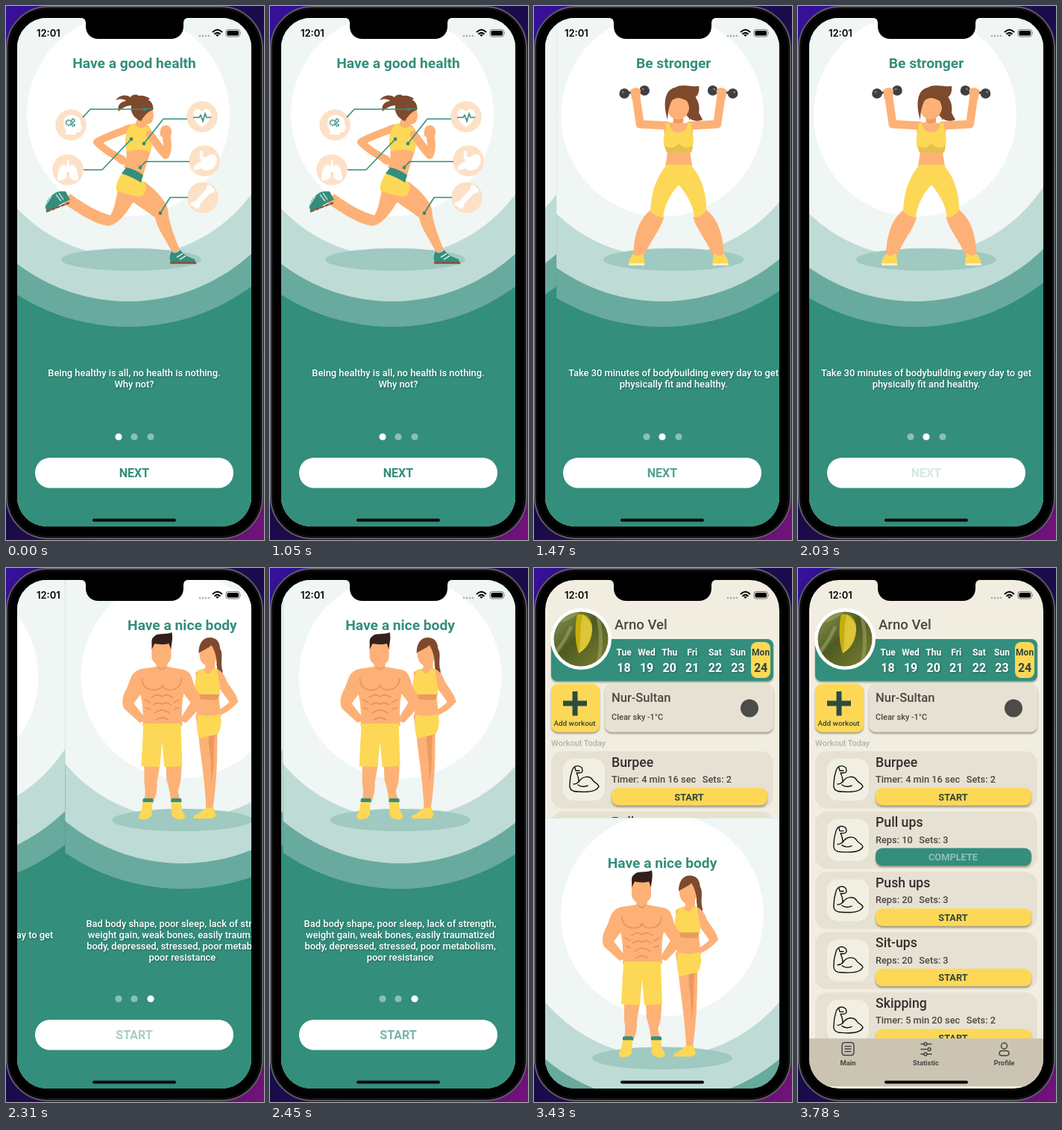
Recreate the animation shown at these times as an HTML page. Size 346 by 714 pixels, loop 3850 ms.

```html
<!DOCTYPE html>
<html lang="en">
<head>
<meta charset="utf-8">
<title>Fitness app intro</title>
<style>
  html, body { margin: 0; width: 100%; height: 100%; overflow: hidden; background: #1b0d4e; }
  svg { display: block; }
  text { font-family: Roboto, Arial, sans-serif; font-weight: 500; }
  .b { font-weight: 700; }
  .mid { text-anchor: middle; }
  .teal { fill: #338e7c; }
  .skin { fill: #fdb176; }
  .shade { fill: #ea9a5f; }
  .sun { fill: #fdd856; }
  .hair { fill: #7d4a2d; }
  .dark { fill: #3f3f42; }
  .card { fill: #e7e1d3; }
  .ink { fill: #484844; }
  .line { fill: none; stroke: #338e7c; stroke-width: 1.6; }
  .crease { fill: none; stroke: #e8965a; stroke-width: 1.8; stroke-linecap: round; }
  .limb { fill: none; stroke: #fdb176; stroke-linecap: round; stroke-linejoin: round; }
  .soft { filter: drop-shadow(1px 1px 1px rgba(0, 0, 0, .3)); }
  .lift { filter: drop-shadow(0 2px 1px rgba(60, 50, 30, .45)); }
  .tab { fill: none; stroke: #44443f; stroke-width: 1.5; stroke-linecap: round; }
</style>
</head>
<body>
<svg width="346" height="714" viewBox="0 0 346 714">
  <defs>
    <linearGradient id="desk" x1="0" y1="0" x2="1" y2="1">
      <stop offset="0" stop-color="#37109a"/><stop offset=".5" stop-color="#190b4a"/><stop offset="1" stop-color="#74127c"/>
    </linearGradient>
    <linearGradient id="leaves" x1="0" y1="0" x2="1" y2="1">
      <stop offset="0" stop-color="#8d9a58"/><stop offset=".45" stop-color="#4f5a22"/><stop offset="1" stop-color="#7c8233"/>
    </linearGradient>
    <clipPath id="screen"><rect x="15" y="16" width="314" height="680" rx="40"/></clipPath>
    <clipPath id="page"><rect x="15" y="16" width="314" height="680"/></clipPath>
    <clipPath id="face"><circle cx="63" cy="95" r="36.5"/></clipPath>
  </defs>

  <rect width="346" height="714" fill="url(#desk)"/>
  <rect x="1" y="1" width="343" height="711" rx="55" fill="#000" stroke="#5f5e65" stroke-width="2"/>
  <rect x="3.5" y="3.5" width="338" height="706" rx="52" fill="none" stroke="#1d1d20"/>

  <g clip-path="url(#screen)">
    <g id="home"></g>
    <g id="intro">
      <rect class="teal" x="15" y="16" width="314" height="680"/>
      <g id="pages"></g>
      <g id="dots" fill="#fff"></g>
      <rect x="39" y="604" width="266" height="40.5" rx="20" fill="#fff"/>
      <text id="label" class="b mid teal" x="172" y="630" font-size="16"></text>
    </g>
    <rect x="116" y="685.5" width="112" height="4" rx="2" fill="#0a0a0a"/>
  </g>

  <path d="M101 15H244V16C240 16 238 19 238 23V27C238 37 231 44 221 44H124C114 44 107 37 107 27V23C107 19 105 16 101 16Z"/>
  <text x="41" y="41" font-size="13" style="font-family:Inter,Arial,sans-serif;font-weight:600">12:01</text>
  <g fill="#a9adab">
    <circle cx="260" cy="40" r="1.3"/><circle cx="264" cy="40" r="1.3"/><circle cx="268" cy="40" r="1.3"/><circle cx="272" cy="40" r="1.3"/>
  </g>
  <g fill="none" stroke="#000" stroke-width="2">
    <path d="M277 35Q283.500 28.500 290 35M279.500 37.700Q283.500 33.800 287.500 37.700"/>
    <path d="M281.300 38.700Q283.500 37 285.700 38.700L283.500 41Z" fill="#000" stroke="none"/>
  </g>
  <rect x="295" y="31.500" width="18.500" height="9.500" rx="2.800" fill="none" stroke="#777"/>
  <rect x="296.500" y="33" width="15.500" height="6.500" rx="1.600"/>
  <path d="M314.700 34.500Q316 36.200 314.700 38Z" fill="#777"/>
</svg>

<script>
const $ = id => document.getElementById(id);
const path = (cls, d) => `<path class="${cls}" d="${d}"/>`;
const limb = (w, d) => `<path class="limb" stroke-width="${w}" d="${d}"/>`;
const disc = (x, y, r, cls, fill) => `<circle cx="${x}" cy="${y}" r="${r}" ${cls ? `class="${cls}"` : `fill="${fill}"`}/>`;
const box = (x, y, w, h, r, cls) => `<rect x="${x}" y="${y}" width="${w}" height="${h}" rx="${r}" class="${cls}"/>`;
const text = (x, y, size, cls, s, extra = '') =>
  `<text x="${x}" y="${y}" font-size="${size}" class="${cls}" ${extra}>${s}</text>`;

// ---- intro illustrations ----
const badge = (x, y) => disc(x, y, 20.8, '', '#fde1c7');
const pointer = (d, x, y) => path('line', d) + disc(x, y, 2.4, 'teal');
const white = d => `<path fill="#fff" d="${d}"/>`;
const shoe = d => path('teal', d);

const runner = [
  badge(87, 159), badge(83, 219), badge(263, 148), badge(266, 207), badge(264, 256),
  white('M80 172V165C74 156 77 146 88 146C98 146 101 153 100 158L103 164H100V169H94V172Z'),
  ...[[84, 156, 3.4], [90, 153, 2], [90, 159, 1.8]].map(([x, y, r]) =>
    `<circle cx="${x}" cy="${y}" r="${r}" fill="none" stroke="#338e7c" stroke-width="2" stroke-dasharray="1.6 .7"/>`),
  white('M82 206H84.500V216C89 207 96 214 97 230C97 236 91 234 85 229V222H81V229C75 234 69 236 69 230C70 214 77 207 82 216Z'),
  white('M263 162C247 151 250 138 257 138Q261 138 263 142Q265 138 269 138C277 138 279 151 263 162Z'),
  path('line', 'M251 149H259L261 146L264 154L267 144L269 149H275'),
  white('M260 194H264C263 202 267 205 271 200C278 195 285 201 282 210C279 219 270 222 263 218C258 216 255 222 252 219C250 211 260 211 262 207C259 203 260 199 260 194Z'),
  white('M269 244C268 237 276 238 276 243C282 243 281 251 274 250L260 265C261 272 253 273 252 268C245 267 248 260 254 261Z'),
  // far arm and leg
  limb(10, 'M166 163C150 170 133 175 122 182C132 192 145 200 156 205'),
  path('skin', 'M150 200C158 198 164 205 160 212C154 213 149 209 148 205Z'),
  path('skin', 'M151 241C147 260 146 270 140 280C120 274 102 263 86 251L77 264C96 276 117 291 136 294C151 294 163 274 176 254Z'),
  shoe('M80 248L86 259C77 263 70 266 66 271L54 274C50 267 57 256 63 252C67 248 73 247 80 248Z'),
  `<path d="M61 254L52 268L54 275L66 272M67 252L74 261M71 250L77 259" fill="none" stroke="#d9e8e4" stroke-width="1.3"/>`,
  `<path d="M54 275L85 263" fill="none" stroke="#8c4c37" stroke-width="2.300" stroke-dasharray="6 1"/>`,
  // near leg
  path('skin', 'M186 235C200 245 215 261 217 272C218 288 225 306 233 326L223 330C215 313 202 297 200 283C186 272 170 263 157 252Z'),
  shoe('M222 328C226 333 231 329 234 326C238 334 245 335 253 339L255 344H222C218 338 220 332 222 328Z'),
  `<path d="M220 343.500H255" stroke="#8c4c37" stroke-width="2.600"/><path d="M229 336L237 331M233 339L241 334" stroke="#d9e8e4" stroke-width="1.500"/>`,
  // torso
  path('skin', 'M178 145L190 150L189 159C197 164 197 174 195 190C192 202 188 212 184 226L158 216C163 203 162 194 160 183C160 172 163 162 174 157Z'),
  path('sun', 'M166 160L172 156C176 164 183 165 188 160L193 164C198 173 197 183 193 195C184 191 172 191 162 195C161 184 158 170 166 160Z'),
  path('sun', 'M157 222L184 234C190 241 188 246 184 252C178 258 169 253 148 247C147 238 151 229 157 222Z'),
  path('teal', 'M161 216C170 217 178 222 184 226L181 236C173 231 165 227 155 224Z'),
  limb(11, 'M193 172C199 180 206 190 214 199C218 190 216 177 214 169'),
  path('skin', 'M207 174C205 162 211 158 217 160C224 163 223 171 219 177Z'),
  // head
  path('skin', 'M178 130L196 130L198 147C197 155 194 159 187 158L177 151Z'),
  path('hair', 'M197 139C199 129 190 122 181 124C178 116 169 118 167 122C160 117 151 120 147 126C153 124 158 124 161 127C153 128 149 133 151 141C156 136 162 133 168 133C166 143 173 151 181 154C185 148 188 142 197 139Z'),
  path('hair', 'M170 130C173 117 185 118 193 124L181 132Z'),
  pointer('M103 149L113 138H186', 186, 138), '<path class="line" d="M186 138L198 137"/>',
  pointer('M243 151H211L185 184', 185, 184),
  pointer('M104 219H129L168 178', 168, 178),
  pointer('M246 208H187L180 216', 180, 216),
  pointer('M244 256H220L207 277', 207, 277),
].join('');

const dumbbell = (x1, y1, x2, y2) =>
  `<path d="M${x1} ${y1}L${x2} ${y2}" stroke="#3f3f42" stroke-width="3"/>` +
  [[x1, y1], [x2, y2]].map(([x, y]) => disc(x, y, 6.8, 'dark') + disc(x - 2, y - 2, 1.6, '', '#77777a')).join('');
const flip = s => s + `<g transform="translate(357.500) scale(-1 1)">${s}</g>`;

const lifter = [
  path('hair', 'M188 112C203 118 208 130 206 143L211 152C203 156 193 153 188 144Z'),
  flip(
    limb(11, 'M164 160L127 158L122 123') +
    path('skin', 'M142 272C151 276 157 278 159 283C154 300 141 314 133 333H118C119 311 123 287 142 272Z') +
    path('sun', 'M117 331Q124 337 131 330C132 336 134 341 133 346H112C111 339 116 337 117 331Z') +
    '<path d="M112 345.500H133" stroke="#fff4cf" stroke-width="2.500"/>' +
    dumbbell(106, 117, 133, 113) +
    path('skin', 'M114 113Q121 106 128 112L127 125H116Z')),
  path('skin', 'M172 146H185V156L197 159C200 172 196 184 194 195L197 214H161L164 195C161 184 158 171 160 158L172 155Z'),
  path('sun', 'M161 157L166 156C167 165 172 169 179 169C186 169 190 165 191 156L196 157C195 166 201 176 198 186L195 196H163L159 186C157 176 163 166 161 157Z'),
  `<path d="M160 187Q170 193 179 184Q188 193 198 187L196 196H163Z" fill="#e8c051"/>`,
  path('sun', 'M163 212H195C209 229 216 247 216 273C211 280 206 282 200 283C198 264 188 250 179 239C169 250 160 264 158 283C151 282 146 279 141 275C142 248 149 229 163 212Z'),
  '<path class="shade" d="M172 148Q179 155 185 148V154Q179 160 172 155Z"/>',
  '<ellipse class="skin" cx="178" cy="135" rx="15" ry="16.500"/>',
  path('hair', 'M164 152C158 133 159 112 174 109C184 103 195 109 206 107C207 116 204 122 197 124C202 131 200 145 193 153C194 142 194 134 190 127C181 122 176 122 170 126C166 133 164 143 164 152Z'),
].join('');

const couple = [
  // woman
  path('hair', 'M218 105C230 109 222 123 226 137C227 145 223 149 219 148Z'),
  path('skin', 'M203 125H216V134C225 137 229 143 232 152C238 161 246 171 247 179C239 188 230 195 219 198L214 193C222 190 231 184 235 179L222 161C220 172 222 183 224 196L219 222C219 250 219 284 212 329H204C204 296 198 263 194 226L190 198C195 185 194 172 191 158L190 139L203 134Z'),
  path('shade', 'M207 222H216C212 245 217 265 210 288C213 262 207 244 207 222Z'),
  path('sun', 'M194 136L200 135Q207 148 214 134L219 135C219 149 225 158 222 170H192Q186 157 191 146Z'),
  path('shade', 'M192 169H222L219 176C208 178 201 174 193 177Z'),
  path('sun', 'M193 196Q210 200 222 195C226 205 224 214 220 222L195 228C190 217 192 205 193 196Z'),
  path('sun', 'M203 321L214 320L217 330Q216 335 210 335H188Q184 331 193 329Z'),
  '<ellipse class="skin" cx="207" cy="115" rx="12" ry="16"/>',
  path('hair', 'M194 114C194 100 200 93 209 93C220 93 225 102 222 119L218 132C219 121 216 111 211 103C207 108 200 109 194 114Z'),
  // man
  path('skin', 'M137 122H152V132L174 136C186 139 185 151 190 161C196 170 200 179 196 187L177 207L168 204L183 180L174 168C171 181 171 196 172 211H119C120 196 119 181 116 169L107 181L124 203L115 207L94 188C90 180 92 170 98 160C103 150 102 139 117 135L137 132Z'),
  path('skin', 'M121 264H142L138 287Q139 300 133 314H120Q124 300 121 287Z'),
  path('skin', 'M150 264H171Q171 288 166 298L170 314H157Q155 294 151 284Z'),
  path('sun', 'M120 208H170L172 265L148 266L145 232L142 266L117 265Z'),
  box(119, 308, 14, 6, 2, 'teal'), box(157, 308, 14, 6, 2, 'teal'),
  path('sun', 'M119 313H132L131 331Q127 337 116 336Q111 333 117 325Z'),
  path('sun', 'M157 313H170L172 325Q179 333 173 336Q162 337 158 331Z'),
  '<rect class="skin" x="131" y="95" width="26" height="35" rx="12"/>',
  '<path d="M131 109C132 102 129 95 134 92C138 86 149 90 158 86C160 95 157 102 157 109L154 101C147 103 140 102 135 101Z" fill="#351f1b"/>',
  path('crease', 'M118 148Q119 163 134 163Q143 163 145 157Q148 163 156 163Q170 162 171 148M131 173Q138 167 145 172Q152 167 159 173M133 183Q139 178 145 182Q151 178 157 183M135 194Q145 186 155 194M137 203Q145 197 153 203M122 176L129 180M168 176L161 180M123 187L129 189M167 187L161 189M140 133L144 136L149 133'),
].join('');

const pages = [
  { title: 'Have a good health', cx: 164, sx: 168, sy: 339, art: runner,
    lines: ['Being healthy is all, no health is nothing.', 'Why not?'] },
  { title: 'Be stronger', cx: 157, sx: 172, sy: 339, art: lifter,
    lines: ['Take 30 minutes of bodybuilding every day to get', 'physically fit and healthy.'] },
  { title: 'Have a nice body', cx: 172, sx: 172, sy: 337, art: couple,
    lines: ['Bad body shape, poor sleep, lack of strength,', 'weight gain, weak bones, easily traumatized',
      'body, depressed, stressed, poor metabolism,', 'poor resistance'] },
];
$('pages').innerHTML = pages.map(p => `<g><g clip-path="url(#page)">
  ${box(15, 16, 314, 680, 0, 'teal')}
  ${disc(p.cx, 149, 280, '', '#68aa9e')}${disc(p.cx, 149, 246, '', '#bfdbd5')}
  ${disc(p.cx, 130, 205, '', '#eff6f4')}${disc(p.cx, 145.5, 136, '', '#fff')}
  <ellipse cx="${p.sx}" cy="${p.sy}" rx="94" ry="15" fill="#9fc9c1"/>
  ${p.art}
  ${text(172, 82.5, 19.2, 'b mid teal', p.title)}
  ${p.lines.map((s, i) => text(172, 502 + 15 * (i - (p.lines.length - 1) / 2), 12.9, 'mid soft', s, 'fill="#fff"')).join('')}
</g></g>`).join('');
$('dots').innerHTML = [151, 172, 194].map(x => `<circle cx="${x}" cy="576" r="4.600"/>`).join('');

// ---- home screen ----
const days = ['Tue', 'Wed', 'Thu', 'Fri', 'Sat', 'Sun', 'Mon'].map((d, i) => {
  const x = 120.5 + 30.6 * i, on = i === 6;
  const look = `fill="${on ? '#2b4640' : '#fff'}"`, cls = on ? 'b mid' : 'b mid soft';
  return (on ? box(291, 99, 26, 48, 8, 'sun') : '') +
    text(x, 116.5, 12, cls, d, look) + text(x, 139, 16, cls, 18 + i, look);
}).join('');

const bicep = `<g fill="none" stroke="#111" stroke-width="1.400" stroke-linejoin="round" stroke-linecap="round">
  <path d="M51 271C53 264 60 263 64 267C66 271 65 274 61 274L57 274C60 279 60 283 60 286C65 278 75 277 79 284C82 288 86 288 87 292C84 299 72 300 59 299C51 299 47 296 48 289C48 283 49 277 51 271Z"/>
  <path d="M55 267L56 271H61M59 290Q64 294 72 291M60 286Q57 289 53 289"/></g>`;

const workouts = [
  ['Burpee', 'Timer: 4 min 16 sec', 2], ['Pull ups', 'Reps: 10', 3], ['Push ups', 'Reps: 20', 3],
  ['Sit-ups', 'Reps: 20', 3], ['Skipping', 'Timer: 5 min 20 sec', 2],
].map(([name, goal, sets], i) => {
  const done = i === 1;
  return `<g transform="translate(0 ${80.6 * i})">
    ${box(23, 245, 298, 76.5, 16, 'card')}
    <rect x="39" y="255" width="56" height="56" rx="14" fill="#f1efe2"/>${bicep}
    ${text(104, 265.5, 17.7, '', name, 'fill="#30302d"')}
    ${text(104, 287, 12.8, 'ink', `${goal}<tspan dx="8.500">Sets: ${sets}</tspan>`)}
    ${box(104, 294, 209, 23.5, 9, (done ? 'teal' : 'sun') + ' lift')}
    ${text(208, 310.5, 12.8, 'b mid', done ? 'COMPLETE' : 'START', `fill="${done ? '#8fc0b4' : '#2b4640'}"`)}
  </g>`;
}).join('');

const tabs = [
  [67, 'Main', 'M63 634.500H71Q75 634.500 75 639V647Q75 651.500 71 651.500H63Q59 651.500 59 647V639Q59 634.500 63 634.500ZM63 639.500H71M63 643H71M63 646.500H71'],
  [171.500, 'Statistic', 'M165 636.500H168M174 636.500H179M165 643.500H172M165 650H168M174 650H179M169 636.500a2 2 0 1 0 4 0a2 2 0 1 0 -4 0M174 643.500a2 2 0 1 0 4 0a2 2 0 1 0 -4 0M169 650a2 2 0 1 0 4 0a2 2 0 1 0 -4 0'],
  [276.500, 'Profile', 'M272.500 639a4 4 0 1 0 8 0a4 4 0 1 0 -8 0M274 645.500H279Q283 645.500 283 649Q283 652 279 652H274Q270 652 270 649Q270 645.500 274 645.500Z'],
].map(([x, name, d]) => path('tab', d) + text(x, 665, 9.4, 'b mid ink', name)).join('');

$('home').innerHTML = `
  <rect x="15" y="16" width="314" height="680" fill="#f1eee1"/>
  ${box(23, 95, 298, 56, 8, 'teal lift')}${days}
  ${disc(63, 95, 41, '', '#fff')}
  <g clip-path="url(#face)">
    <rect x="26" y="58" width="74" height="74" fill="url(#leaves)"/>
    <path d="M26 70Q45 72 58 58M30 112Q45 92 50 78M84 60Q94 90 86 128" fill="none" stroke="#a3ad6c" stroke-width="5" opacity=".5"/>
    <path d="M58 62C70 60 79 68 78 84C76 98 70 107 60 114C55 102 54 78 58 62Z" fill="#c5ae0d"/>
    <path d="M66 62C60 80 64 96 60 114C74 106 80 90 77 75Z" fill="#dcc638"/>
  </g>
  ${text(108, 82, 18.6, 'ink', 'Arno Vel')}
  ${box(23, 155, 65, 64.5, 9, 'sun lift')}
  <path d="M39 181H71M55 165V197.500" stroke="#2b4c45" stroke-width="7"/>
  ${text(54.500, 211, 9.9, 'mid', 'Add workout', 'fill="#2b4640"')}
  ${box(95, 155, 226, 64.5, 9, 'card lift')}
  ${text(104, 179, 16.6, 'ink', 'Nur-Sultan')}${text(104, 203, 11, 'ink', 'Clear sky -1°C')}
  ${disc(289, 187.500, 12, '', '#4b4b49')}
  ${text(23, 238, 11, '', 'Workout Today', 'fill="#b4b1a6"')}
  ${workouts}
  <rect x="15" y="629" width="314" height="64" fill="#ccc4b3"/>${tabs}`;

// ---- motion ----
const LOOP = 3850, STEP = 70, WIDTH = 314, HEIGHT = 680;
const swipe = t => t <= 0 ? 0 : 1 - Math.exp(-Math.pow(t / 105, 1.6));
const spring = t => 1 - (1 + t * .00945) * Math.exp(-t * .00945);
const drop = t => spring(Math.min(Math.max(t, 0), 510)) / spring(510);

// [pressed, released, fade-back duration]
const taps = [[1260, 1260, 270], [2030, 2170, 490], [3150, 3290, 490]];
const labelOpacity = t => {
  const tap = taps.filter(p => t >= p[0]).pop();
  return tap ? .2 + .8 * Math.min(1, Math.max(0, (t - tap[1]) / tap[2])) : 1;
};

const pageNodes = [...$('pages').children], dotNodes = [...$('dots').children];
const start = performance.now();

function draw() {
  const now = (performance.now() - start) % LOOP;
  const t = Math.floor(now / STEP) * STEP;
  const scroll = swipe(t - 1260) + swipe(t - 2170);
  const active = Math.round(scroll);
  pageNodes.forEach((p, i) => p.setAttribute('transform', `translate(${(WIDTH * (i - scroll)).toFixed(2)} 0)`));
  dotNodes.forEach((d, i) => d.setAttribute('opacity', i === active ? 1 : .43));
  $('label').textContent = active === 2 ? 'START' : 'NEXT';
  $('label').setAttribute('opacity', labelOpacity(t));
  $('intro').setAttribute('transform', `translate(0 ${(HEIGHT * drop(t - 3270)).toFixed(2)})`);
  requestAnimationFrame(draw);
}
draw();
</script>
</body>
</html>
```
